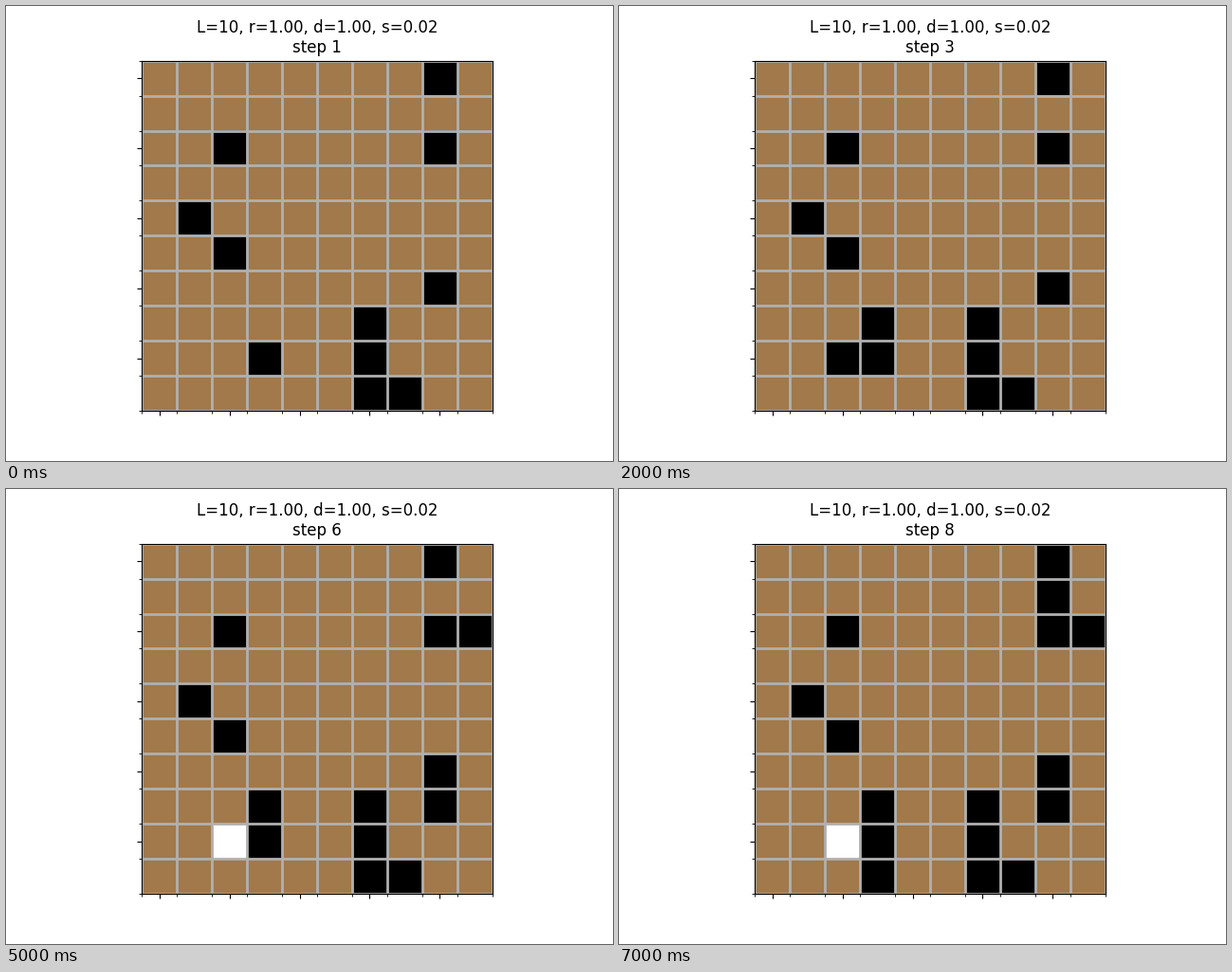
Write a matplotlib script that moves like this. It is 640x480 px and loops after 8000 ms.

```python
import numpy as np
import matplotlib.pyplot as plt
from matplotlib.animation import FuncAnimation

SIZE = 10
STEPS = 8
DEAD, EMPTY, ALIVE = -1, 0, 1

# (row, column) of the dark cells at the first step
START = [(0, 8), (2, 2), (2, 8), (4, 1), (5, 2), (6, 8),
         (7, 6), (8, 3), (8, 6), (9, 6), (9, 7)]

# One cell changes at each following step: row, column, new state
CHANGES = [(7, 3, DEAD), (8, 2, DEAD), (7, 8, DEAD), (8, 2, ALIVE),
           (2, 9, DEAD), (9, 3, DEAD), (1, 8, DEAD)]


def grid_at(step):
    grid = np.full((SIZE, SIZE), EMPTY)
    for row, col in START:
        grid[row, col] = DEAD
    for row, col, state in CHANGES[:step]:
        grid[row, col] = state
    return grid


def title_at(step):
    return f"L={SIZE}, r=1.00, d=1.00, s=0.02\nstep {step + 1}"


fig, ax = plt.subplots(figsize=(6.4, 4.8), dpi=100)
image = ax.imshow(grid_at(0), cmap="cubehelix", vmin=DEAD, vmax=ALIVE)
title = ax.set_title(title_at(0))

edges = np.arange(-0.5, SIZE)
for axis in (ax.xaxis, ax.yaxis):
    axis.set_ticks(range(0, SIZE, 2), labels=[])
    axis.set_ticks(edges, minor=True)
ax.grid(which="minor", color="#b0b0b0", linewidth=2)


def update(step):
    image.set_data(grid_at(step))
    title.set_text(title_at(step))
    return image, title


anim = FuncAnimation(fig, update, frames=STEPS, interval=1000,
                     repeat=True, repeat_delay=0, blit=False)
plt.show()
```
